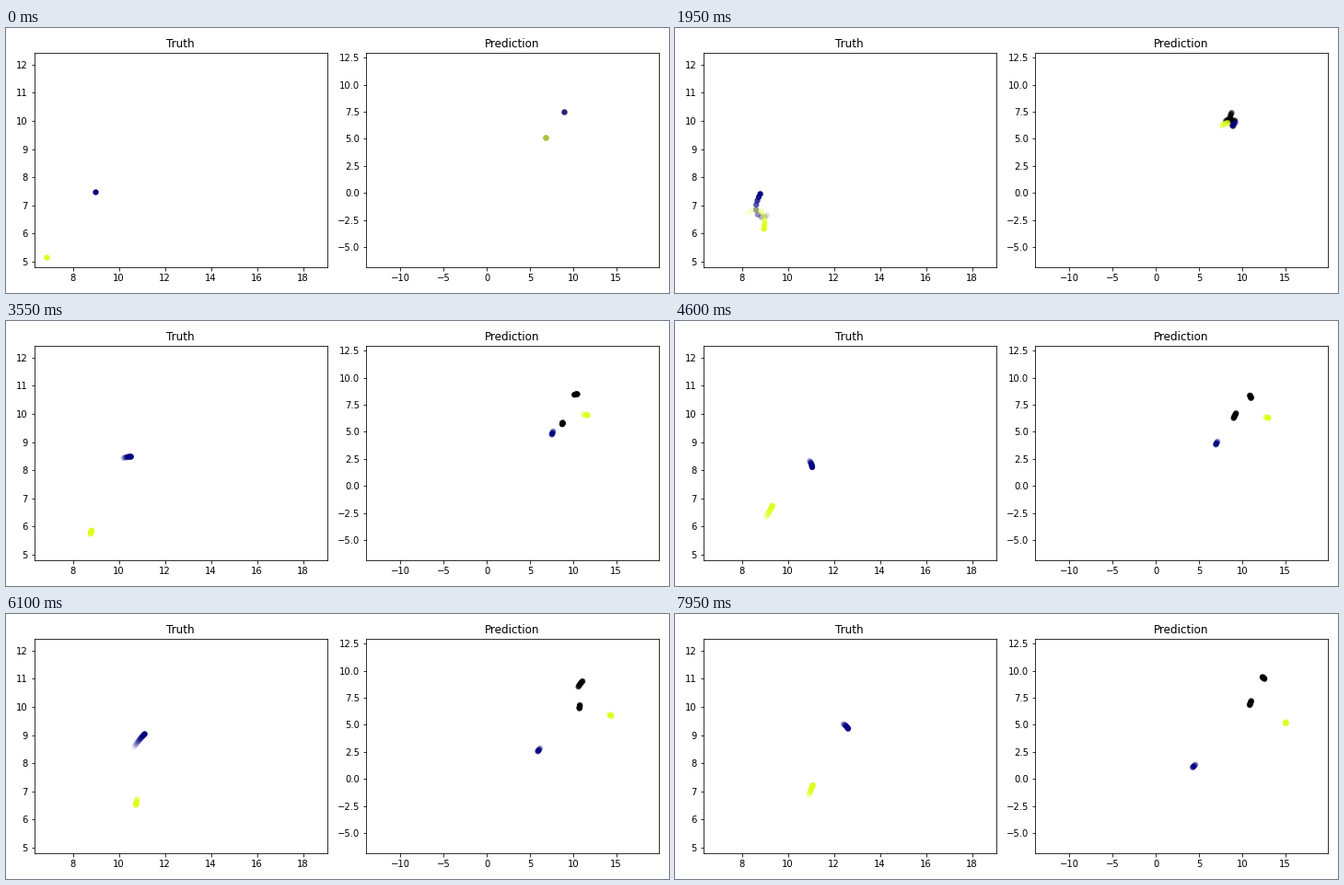
These frames come from a looping animation (720 px wide and 288 px high, 8 s). A matplotlib script:

```python
import numpy as np
import matplotlib.pyplot as plt
from matplotlib.animation import FuncAnimation
from matplotlib.colors import to_rgb

FRAMES, STEP = 160, 50
TRAIL = 10
NAVY, LIME, BLACK = "#000080", "#deff19", "#000000"

plt.rcParams["font.family"] = "DejaVu Sans"
k = np.arange(FRAMES)


def kepler(t, period=71, a=0.85, e=0.847):
    """Slowly turning ellipse around the centre of mass, solved by bisection."""
    mean = 2 * np.pi * (t - 33.9) / period
    mean = (mean + np.pi) % (2 * np.pi) - np.pi
    lo, hi = np.full(t.shape, -np.pi), np.full(t.shape, np.pi)
    for _ in range(40):
        mid = (lo + hi) / 2
        low = mid - e * np.sin(mid) < mean
        lo, hi = np.where(low, mid, lo), np.where(low, hi, mid)
    ecc = (lo + hi) / 2
    r = a * (1 - e * np.cos(ecc))
    nu = 2 * np.arctan(np.sqrt((1 + e) / (1 - e)) * np.tan(ecc / 2))
    angle = np.radians(-131 + 9.2 * t / period) - nu
    return np.column_stack([r * np.cos(angle), r * np.sin(angle)])


def flyby(start, speed, accel, kick, jump=0.0, at=40, width=4):
    """Smooth drift that is deflected once, around step `at`."""
    u = (k - at) / width
    return (start + speed * k + accel * k**2
            + kick * width * np.log1p(np.exp(u)) + jump / (1 + np.exp(-u)))


# Averaging neighbouring steps softens the close pass.
rel = (kepler(k - 1) + 2 * kepler(k) + kepler(k + 1)) / 4
centre = np.column_stack([7.915 + 0.02475 * k, 6.315 + 0.012 * k])
true_a, true_b = centre + rel, centre - rel
pred_a = np.column_stack([
    flyby(8.94, 0.02, -0.000137, -0.0255, -1.33),
    flyby(7.47, -0.012, 0.00004, -0.039, at=18)])
pred_b = np.column_stack([
    flyby(6.87, 0.03, -0.00041, 0.1025, 1.62),
    flyby(5.16, 0.034, -0.00006, -0.036, 0.37)])

fig, (truth, pred) = plt.subplots(1, 2, figsize=(10, 4), dpi=72)
truth.set(title="Truth", xlim=(6.318, 19.05), ylim=(4.79, 12.43),
          xticks=range(8, 19, 2), yticks=range(5, 13))
pred.set(title="Prediction", xlim=(-14.0, 19.98), ylim=(-6.88, 12.96),
         xticks=range(-10, 16, 5), yticks=np.arange(-5, 12.6, 2.5))
fig.tight_layout()


def trail(ax, track, color, peak=1.0, fading=True):
    dots = ax.scatter([], [], s=6.3**2, linewidths=0, zorder=2)
    return dots, track, to_rgb(color), peak, fading


trails = [
    trail(truth, true_a, NAVY),
    trail(truth, true_b, LIME),
    trail(pred, true_a, BLACK, 0.6, fading=False),
    trail(pred, true_b, BLACK, 0.6, fading=False),
    trail(pred, pred_a, NAVY, 0.6),
    trail(pred, pred_b, LIME, 0.6),
]


def draw(i):
    idx = np.arange(max(0, i - TRAIL + 1), i + 1)
    fade = 1 - (i - idx) / (TRAIL - 1)
    for dots, track, rgb, peak, fading in trails:
        alpha = peak * (fade if fading else np.ones(len(idx)))
        dots.set_offsets(track[idx])
        dots.set_facecolors([(*rgb, a) for a in alpha])
    return [t[0] for t in trails]


anim = FuncAnimation(fig, draw, frames=FRAMES, interval=STEP,
                     repeat=True, repeat_delay=0, blit=False)
plt.show()
```
